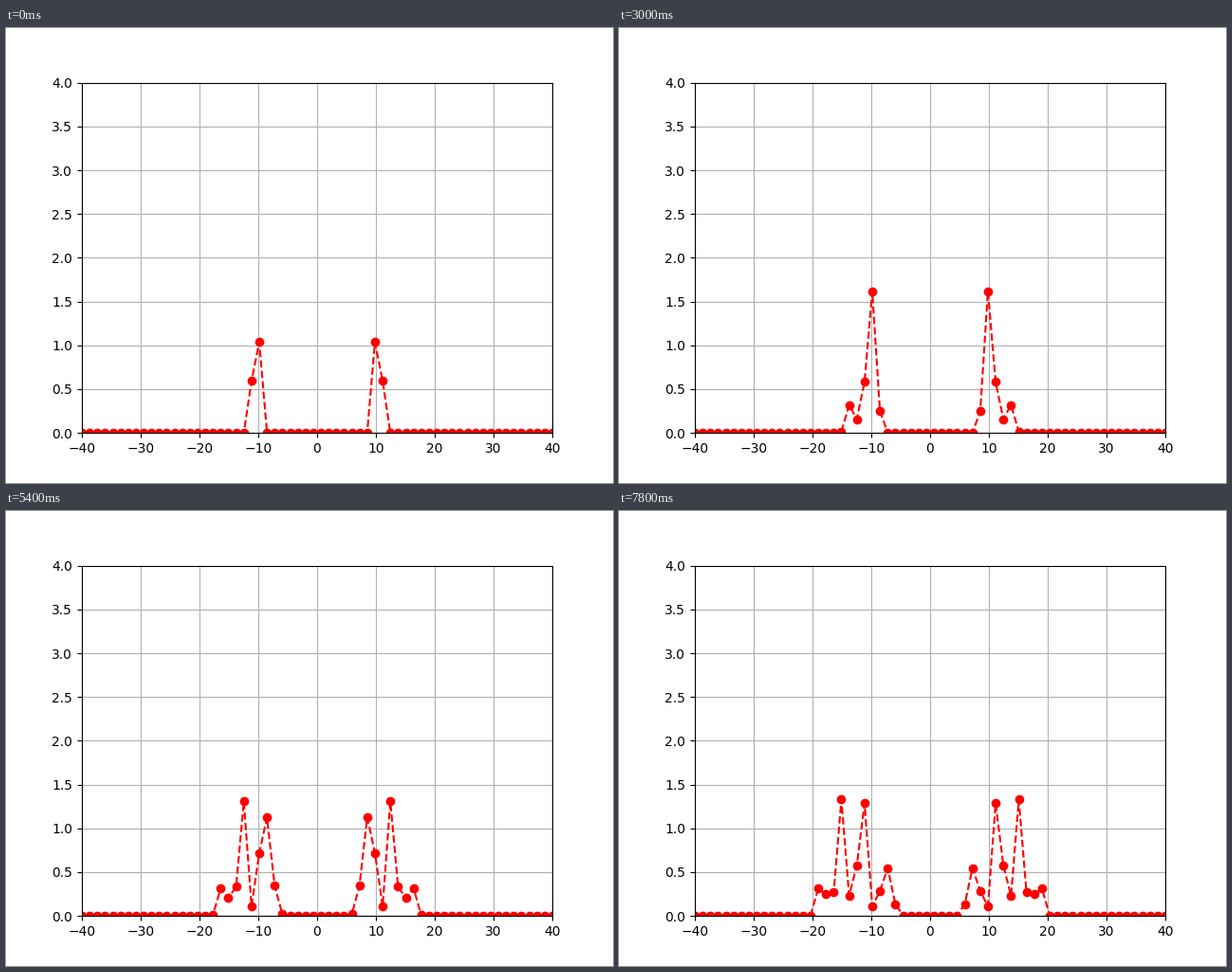
A matplotlib script for the animation above (8 s loop, 640 by 480 pixels).

```python
import numpy as np
import matplotlib.pyplot as plt
from matplotlib.animation import FuncAnimation

FRAMES = 40
POINTS = 62
HALF_WAVE = 2.83    # grid cells between zero crossings
SPEED = 1 / 6       # grid cells per frame, outwards
EDGE = 24.1         # inner turning point, as a grid index

cell = np.arange(POINTS // 2)


def step(z):
    return 1 / (1 + np.exp(-z))


def amplitude(n):
    """Wave running outwards (to lower indices) from the left emitter."""
    # Crests travel outside the edge and swing in place inside it.
    path = EDGE - 0.6 * np.log1p(np.exp((EDGE - cell) / 0.6))
    s = path + SPEED * n
    node = 23.85 + 0.005 * n
    front = step((s - 22.6) / 0.9)
    inner = step((23.4 + 0.06 * n - cell) / 0.5)
    wave = -1.2 * front * inner * np.sin(np.pi * (s - node) / HALF_WAVE)

    # Start-up swing at the emitter, soon damped.
    spot = np.exp(-((cell - 22.6) / 0.8) ** 2)
    swing = 1.15 * np.exp(-n / 14) * np.cos(np.pi * (n + 4) / 15)
    return wave + spot * swing


def profile(n):
    half = amplitude(n) ** 2
    return np.concatenate([half, half[::-1]])


fig, ax = plt.subplots(figsize=(6.4, 4.8), dpi=100)
ax.set_xlim(-40, 40)
ax.set_ylim(0, 4)
ax.grid(True)
x = np.linspace(-40, 40, POINTS)
line, = ax.plot(x, profile(0), "ro--")


def update(n):
    line.set_ydata(profile(n))
    return line,


anim = FuncAnimation(fig, update, frames=FRAMES, interval=200, repeat=True,
                     repeat_delay=0, blit=False)
plt.show()
```
